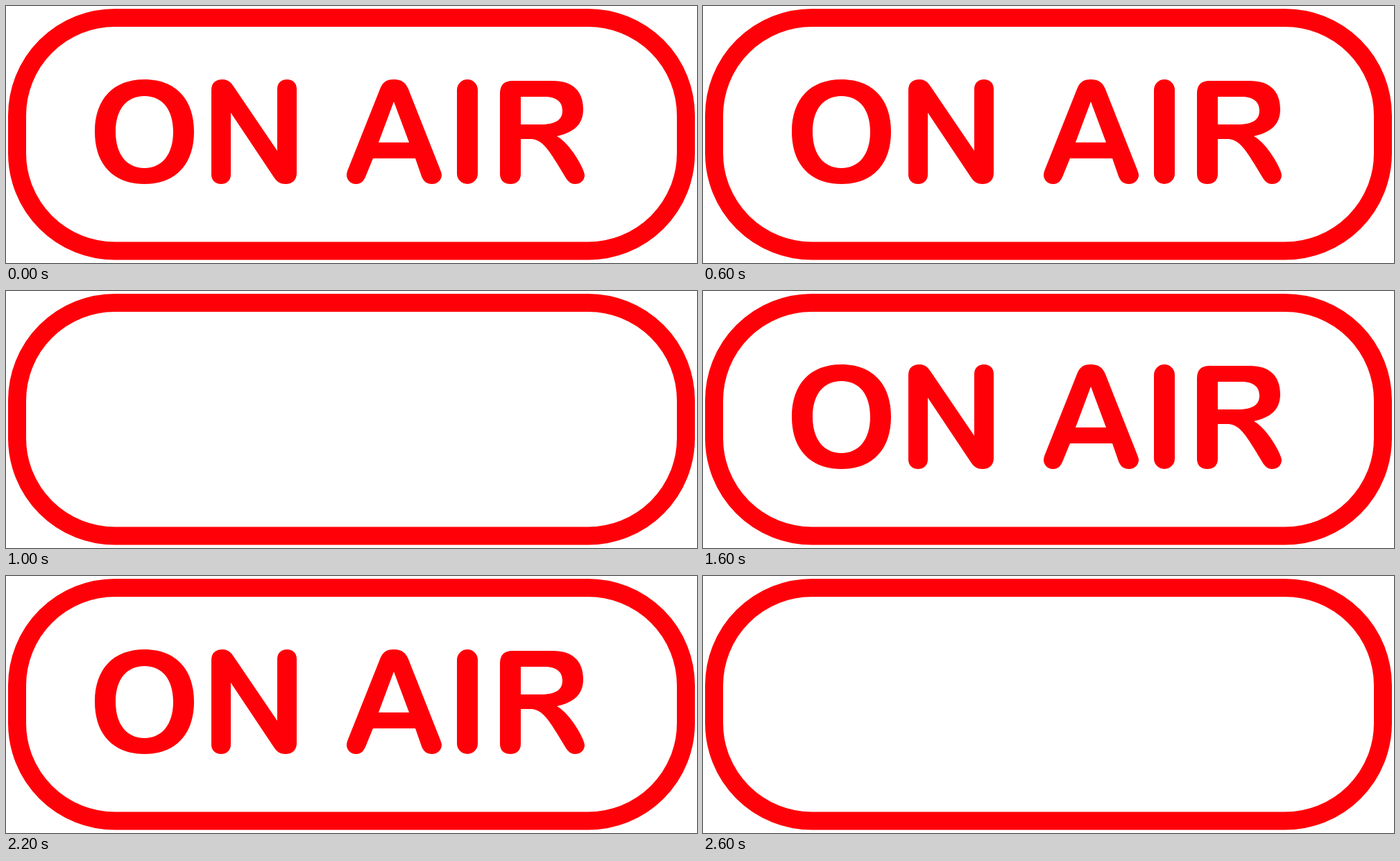
An HTML page that plays this animation: 996x371 px, repeating every 3.2 s.

```html
<!DOCTYPE html>
<html lang="en">
<head>
<meta charset="utf-8">
<title>On air sign</title>
<style>
  html, body { margin: 0; width: 100%; height: 100%; overflow: hidden; background: #fff; }
  svg { display: block; width: 996px; height: 371px; fill: #ff0008; }
  .border { fill: none; stroke: #ff0008; stroke-width: 26; }
</style>
</head>
<body>
<svg viewBox="0 0 996 371" role="img" aria-label="ON AIR">
  <rect class="border" x="16" y="17" width="964" height="336.5" rx="141"/>
  <!-- Rounded sign lettering -->
  <g id="lettering" fill-rule="evenodd">
    <path d="M199.5 106C244 106 271 134 271 181.5S244 257 199.5 257 128 229 128 181.5 155 106 199.5 106Z
             M199.5 130C174 130 158 149 158 181.5S174 234 199.5 234 241 214 241 181.5 225 130 199.5 130Z"/>
    <path d="M296 122C296 111 302 106 312 106C322 106 326 113 330 119L391 209V120C391 111 397 106 405 106
             S419 111 419 120V241C419 251 413 257 403 257C394 257 390 253 386 247L324 154V243
             C324 252 318 257 310 257S296 252 296 243Z"/>
    <path d="M492.500 237L539 120C543 110 548 106 559 106C571 106 576 111 580 120L625 234
             C627 239 628 242 628 244C628 251 622 257 614 257C606 257 601 253 598 243L590 220H529L520 242
             C516 253 512 257 504 257C497 257 491 251 491 244C491 242 491.500 240 492.500 237Z
             M559 138L537 197H581Z"/>
    <rect x="650" y="106" width="30" height="151" rx="15"/>
    <path d="M712 126C712 114 718 108 730 108H788C816 108 832 122 832 149C832 170 820 182 794 188
             C814 199 834 236 834 244C834 251 829 257 820 257C813 257 809 252 805 245
             C780 203 772 192 755 192H742V242C742 252 736 257 727 257S712 252 712 242Z
             M742 131V171H770C793 171 802 164 802 151C802 138 793 131 776 131Z"/>
  </g>
</svg>
<script>
  const PERIOD = 1600, LIT = 1000;
  const lettering = document.getElementById("lettering");
  const start = performance.now();

  function draw() {
    const time = (performance.now() - start) % PERIOD;
    lettering.style.visibility = time < LIT ? "visible" : "hidden";
    requestAnimationFrame(draw);
  }
  draw();
</script>
</body>
</html>
```
